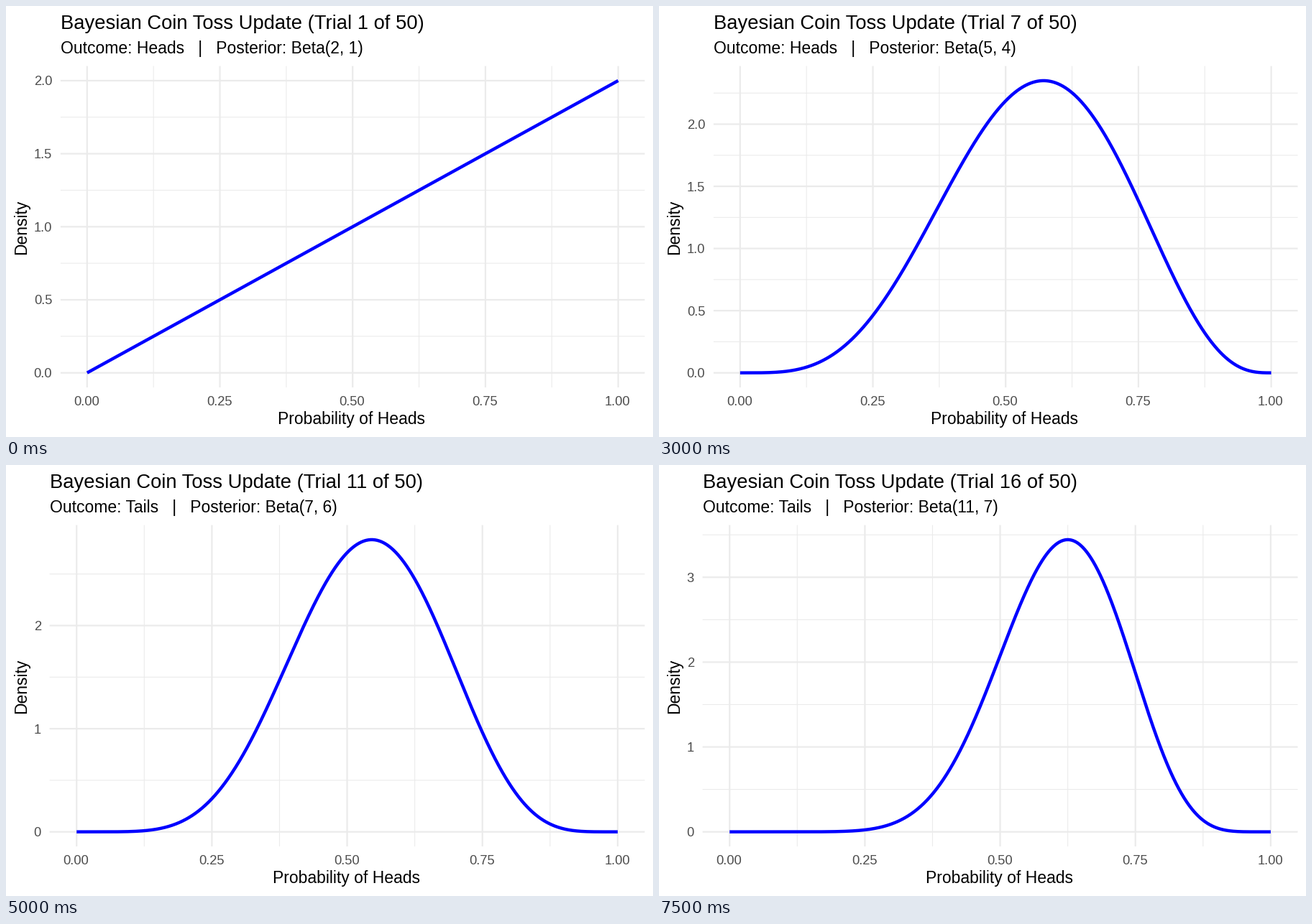
These frames come from a looping animation (900x600 px, 8000 ms). A matplotlib script:

```python
import math

import matplotlib.pyplot as plt
import numpy as np
from matplotlib.animation import FuncAnimation

W, H, DPI = 900, 600, 100
PX = 72 / DPI
TOSSES = "HTHTTHHTHHTHHHHT"
TOTAL = 50
TOP, BOTTOM, RIGHT = 83.6, 531.0, 888.5
GRID, TICK = "#ebebeb", "#4d4d4d"

plt.rcParams["font.family"] = "Liberation Sans"
fig = plt.figure(figsize=(W / DPI, H / DPI), dpi=DPI, facecolor="white")
ax = fig.add_axes([0, 0, 1, 1])


def label(x, y, text, size, color="black", ha="left", **kw):
    ax.text(x, y, text, fontsize=size * PX, color=color, ha=ha,
            va="baseline", **kw)


def line(xs, ys, width, color=GRID):
    ax.plot(xs, ys, color=color, lw=width * PX, snap=False,
            solid_capstyle="butt", solid_joinstyle="round")


def beta_pdf(x, a, b):
    norm = math.gamma(a + b) / (math.gamma(a) * math.gamma(b))
    return norm * x ** (a - 1) * (1 - x) ** (b - 1)


def draw(i):
    ax.clear()
    ax.set_xlim(0, W)
    ax.set_ylim(H, 0)
    ax.axis("off")

    seen = TOSSES[:i + 1]
    a, b = 1 + seen.count("H"), 1 + seen.count("T")
    p = np.linspace(0, 1, 1001)
    density = beta_pdf(p, a, b)
    peak = density.max()

    # Both axes extend 5% past the data on each side.
    step = 0.5 if peak < 2.5 else 1
    left = 75.9 if step < 1 else 60.6
    span_x, span_y = (RIGHT - left) / 1.1, (BOTTOM - TOP) / 1.1

    def px(v):
        return left + span_x * (v + 0.05)

    def py(v):
        return BOTTOM - span_y * (v / peak + 0.05)

    halves = range(int(1.05 * peak / (step / 2)) + 1)
    for odd, width in ((1, 1.11), (0, 2.22)):
        for k in halves:
            if k % 2 == odd:
                y = py(k * step / 2)
                line([left, RIGHT], [y, y], width)
        for k in range(odd, 9, 2):
            x = px(k / 8)
            line([x, x], [TOP, BOTTOM], width)

    line(px(p), py(density), 4.45, "#0000ff")

    for k in halves[::2]:
        v = k * step / 2
        text = f"{v:.1f}" if step < 1 else f"{v:.0f}"
        label(left - 11.7, py(v) + 6.5, text, 18.33, TICK, "right")
    for k in range(5):
        label(px(k / 4) - 0.7, 555.5, f"{k / 4:.2f}", 18.33, TICK, "center")

    label((left + RIGHT) / 2 - 1.2, 582.4, "Probability of Heads", 22.92,
          ha="center")
    label(28.4, (TOP + BOTTOM) / 2 + 1, "Density", 22.92, ha="center",
          rotation=90, rotation_mode="anchor")

    outcome = "Heads" if seen[-1] == "H" else "Tails"
    label(left, 31.7, f"Bayesian Coin Toss Update (Trial {i + 1} of {TOTAL})",
          27.35)
    label(left, 66.2, f"Outcome: {outcome}   |   Posterior: Beta({a}, {b})",
          22.92)
    return []


anim = FuncAnimation(fig, draw, frames=len(TOSSES), interval=500,
                     init_func=lambda: draw(0), repeat=True, repeat_delay=0)
plt.show()
```
